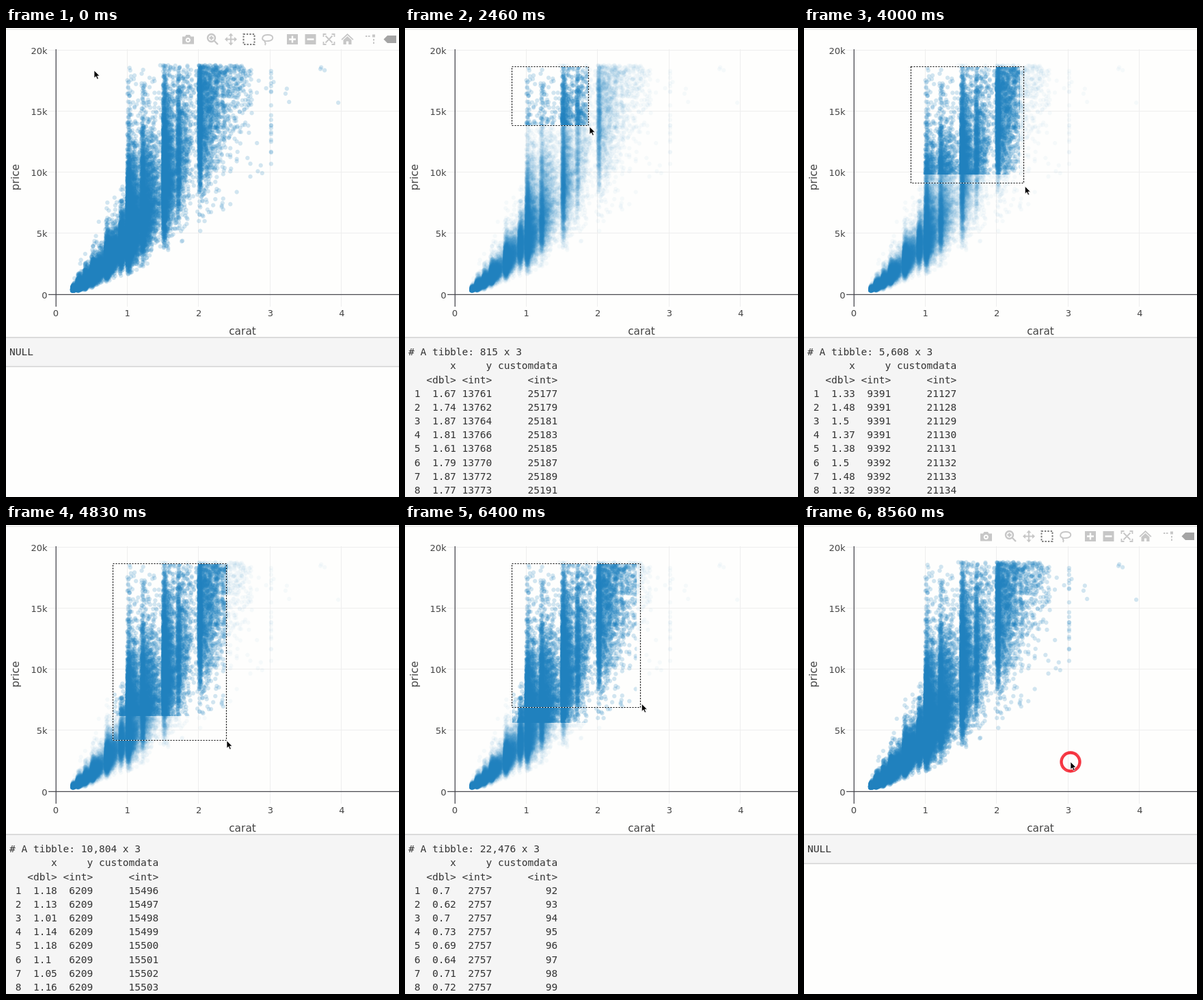
An HTML page with a canvas that plays this animation: 575x685 px, repeating every 8600 ms.

```html
<!DOCTYPE html>
<html lang="en">
<head>
<meta charset="utf-8">
<title>Linked selection</title>
<style>
  html, body { margin: 0; width: 575px; height: 685px; overflow: hidden; background: #fefefd; }
  svg, canvas { position: absolute; left: 0; top: 0; display: block; }
  text { fill: #444; font-family: "DejaVu Sans", sans-serif; }
  .tick { font-size: 13px; }
  .title { font-size: 15.4px; text-anchor: middle; }
  .console text { fill: #333; font: 14.5px "DejaVu Sans Mono", monospace; white-space: pre; }
</style>
</head>
<body>
<svg width="575" height="685">
  <path d="M0 2H575" stroke="#e6e6e6" stroke-width="1.5"/>
  <g id="axes"></g>
  <text class="title" x="346" y="447.5">carat</text>
  <text class="title" transform="translate(19 218) rotate(-90)">price</text>
  <g class="console">
    <rect id="panel" x="-2" y="452" width="579" height="43" fill="#f5f5f5" stroke="#d2d2d2" stroke-width="1.5"/>
    <g id="lines"></g>
  </g>
</svg>
<canvas id="plot" width="575" height="408"></canvas>
<svg width="575" height="685">
  <g id="modebar" fill="#c7c7c7" stroke="#c7c7c7" stroke-width="0">
    <path fill-rule="evenodd" d="M258 12.5h4l1.5-2.5h5.5l1.5 2.5h4.500v11h-17zM266.300 14a3.600 3.600 0 1 0 .01 0zm0 2a1.600 1.600 0 1 1-.01 0z"/>
    <g fill="none" stroke-width="2.4">
      <circle cx="300.5" cy="14.5" r="5.5"/><path d="M304.500 18.500l5.500 5.500M297.500 14.500h6M300.500 11.500v6"/>
      <path stroke-width="1.8" d="M321.500 16.500h15M329 9v15"/>
    </g>
    <path d="M329 7.500l3.500 4h-7zM329 25.500l3.500-4h-7zM320 16.500l4-3.500v7zM338 16.500l-4-3.500v7z"/>
    <rect x="347.5" y="9" width="16" height="15" fill="none" stroke="#7c7c7c" stroke-width="2" stroke-dasharray="2.4 2"/>
    <path fill="none" stroke-width="1.9" d="M379 19c-6-2-5-9 4-9s10 8 1 9c-4 .6-7-1-5 2 1 1 1 2 0 4"/>
    <path fill-rule="evenodd" d="M411 9h16v15h-16zM417.800 11.500v3.800h-3.800v2.400h3.800v3.800h2.400v-3.800h3.800v-2.400h-3.800v-3.800z"/>
    <path fill-rule="evenodd" d="M437.500 9h16v15h-16zM440.500 15.300v2.400h10v-2.400z"/>
    <path fill="none" stroke-width="1.8" d="M464.500 13V9h4M476.500 9h4v4M480.500 20v4h-4M468.500 24h-4v-4M467.500 11.500l10 10M477.500 11.500l-10 10"/>
    <path d="M499.500 8l9 8.500-1.200 1.200-7.800-7.300-7.800 7.300-1.200-1.200zM499.500 12l6 5.500v6.500h-4.300v-4.500h-3.400v4.500h-4.300v-6.500z"/>
    <path d="M526 11h2.500v2h-2.500zM530 11h2.500v2h-2.500zM536 9.500h4v4h-4zM537 16h2v2.500h-2zM537 20.500h2v2.500h-2z"/>
    <path fill="#a4a4a4" d="M552.500 16.500l5.500-5.500h13v11h-13z"/>
  </g>
  <g id="box" fill="none">
    <rect stroke="#fff"/>
    <rect stroke="#000" stroke-width="1.2" stroke-dasharray="2 2"/>
  </g>
  <g id="rings" fill="none" stroke="#f3101e" stroke-opacity=".85"></g>
  <path id="cursor" d="M0 0V11L2.600 8.700 4.400 12.800 6.300 12 4.500 8H8Z" fill="#000" stroke="#fff" stroke-width=".7"/>
</svg>
<script>
const LOOP = 8600, DRAG_START = 1190, DRAG_END = 7000, CLEARED = 8400;
const START = { x: 157, y: 57 };
const $ = id => document.getElementById(id);
const clamp = (v, lo = 0, hi = 1) => Math.min(hi, Math.max(lo, v));
const ramp = (t, from, to) => clamp((t - from) / (to - from));
const xOf = carat => 73 + 104.6 * carat;
const caratAt = x => (x - 73) / 104.6;
const yOf = price => 389.5 - price * 0.01783;

function set(el, attrs) {
  for (const k in attrs) el.setAttribute(k, attrs[k]);
}
function add(parent, tag, attrs, text = "") {
  const el = document.createElementNS("http://www.w3.org/2000/svg", tag);
  set(el, attrs);
  el.textContent = text;
  return parent.appendChild(el);
}

// Axes
const line = (d, stroke, width = 1) => add($("axes"), "path", { d, stroke, "stroke-width": width });
for (let i = 1; i < 5; i++) {
  line(`M${Math.round(xOf(i)) - 0.5} 31V407`, "#eee");
  line(`M62 ${Math.round(yOf(i * 5000)) - 0.5}H575`, "#eee");
}
line("M73.2 31V407M62 389.4H575", "#4a4a50", 1.3);
for (let i = 0; i < 5; i++) {
  add($("axes"), "text", { class: "tick", x: xOf(i), y: 421, "text-anchor": "middle" }, i);
  add($("axes"), "text", { class: "tick", x: 60.5, y: yOf(i * 5000) + 5, "text-anchor": "end" }, i ? i * 5 + "k" : 0);
}

// Simulated stones
let seed = 20;
function random() {
  seed = (seed + 0x6D2B79F5) | 0;
  let r = Math.imul(seed ^ (seed >>> 15), 1 | seed);
  r = (r + Math.imul(r ^ (r >>> 7), 61 | r)) ^ r;
  return ((r ^ (r >>> 14)) >>> 0) / 4294967296;
}
const exponential = () => -Math.log(1 - random());
const normal = () => Math.sqrt(2 * exponential()) * Math.cos(2 * Math.PI * random());

const MEDIAN = 4700, POWER = 1.68;
function priceFor(carat) {
  const up = carat < 1 ? 0.2 : 0.36 / Math.sqrt(carat), down = carat < 1 ? 0.2 : 0.25;
  let price;
  do {
    const z = normal() * (random() < 0.86 ? 1 : 1.7);
    price = MEDIAN * carat ** POWER * Math.exp(z * (z > 0 ? up : down));
  } while (price < Math.max(330, 1650 * carat ** 1.6) || price > 18800);
  return price;
}

const W = 575, H = 408, density = new Float32Array(W * H);
function stamp(x, y) {
  const cx = Math.floor(x), cy = Math.floor(y);
  for (let py = cy - 4; py <= cy + 4; py++)
    for (let px = cx - 4; px <= cx + 4; px++) {
      const cover = clamp(3.6 - Math.hypot(px + 0.5 - x, py + 0.5 - y));
      if (cover && px >= 0 && px < W && py >= 0 && py < H) density[py * W + px] += cover;
    }
}

// Stones crowd just above popular weights: carat, count
const popular = [
  [.23, 1800], [.3, 9500], [.4, 4700], [.5, 7000], [.7, 7500], [.9, 2800],
  [1, 9000], [1.2, 3600], [1.5, 3600], [1.7, 950], [2, 2400]
];
popular.forEach(([size, count], i) => {
  const next = i + 1 < popular.length ? popular[i + 1][0] : 2.6;
  for (let n = 0; n < count; n++) {
    const extra = random() < 0.3 ? 0.03 * random() : 0.35 * (next - size) * exponential();
    const carat = Math.round((size + extra) * 100) / 100;
    if (carat < 2.75) stamp(xOf(carat), yOf(priceFor(carat)));
  }
});
for (let i = 0; i < 38; i++)
  stamp(xOf(i % 2 ? 3.01 : 2.55 + 0.6 * exponential()), yOf(7000 + 11700 * Math.sqrt(random())));

// Overlapping translucent dots, composited from the density
function makeLayer(alpha) {
  const canvas = document.createElement("canvas");
  canvas.width = W;
  canvas.height = H;
  const g = canvas.getContext("2d"), image = g.createImageData(W, H);
  density.forEach((n, i) => image.data.set([32, 129, 190, 255 * (1 - (1 - alpha) ** n)], i * 4));
  g.putImageData(image, 0, 0);
  return canvas;
}
const strong = makeLayer(0.2), faint = makeLayer(0.04);
const plot = $("plot").getContext("2d");

function drawPlot(corner) {
  plot.clearRect(0, 0, W, H);
  if (!corner) return plot.drawImage(strong, 0, 0);
  plot.drawImage(faint, 0, 0);
  const w = Math.round(corner.x - START.x), h = Math.round(corner.y - START.y);
  if (w < 1 || h < 1) return;
  const area = [START.x, START.y, w, h];
  plot.clearRect(...area);
  plot.drawImage(strong, ...area, ...area);
}

// Pointer moves; the brisk ones slow down as they arrive
const move = (from, to, x, y, brisk) => ({ from, to, x, y, brisk });
const moves = [
  move(60, 160, 147, 61),
  move(530, 1150, START.x, START.y),
  move(DRAG_START, 2260, 269, 143, true),
  move(2440, 3100, 302, 181),
  move(3230, 4060, 325, 235),
  move(4100, 4500, 324, 279),
  move(4660, 4760, 323, 315),
  move(4860, 5400, 325, 342),
  move(5630, 6460, 348, 255),
  move(7460, 7660, 443, 344),
  move(7860, 8240, 390, 346)
];
function pointer(t) {
  let x = 129, y = 62;
  for (const m of moves) {
    const p = ramp(t, m.from, m.to), eased = m.brisk ? 1 - (1 - p) ** 3 : p;
    x += (m.x - x) * eased;
    y += (m.y - y) * eased;
  }
  return { x, y };
}

// Console output: each update lists the cheapest selected stones
const update = (time, count, price, id) => ({ time, count, price, id });
const updates = [
  update(1300, 20, 16234, 26550),
  update(1850, 246, 15012, 25931),
  update(2250, 815, 13761, 25177),
  update(3100, 2250, 12565, 24317),
  update(3800, 5608, 9391, 21127),
  update(4480, 10804, 6209, 15496),
  update(5390, 22476, 2757, 92),
  update(6700, 8794, 7538, 17962)
];
function tableRow({ time, count, price, id }, i) {
  const largest = Math.min((price / MEDIAN) ** (1 / POWER), caratAt(pointer(time).x));
  const jitter = Math.abs(Math.sin(id + i * 2.3));
  const carat = Math.round(largest * (0.85 + 0.15 * jitter) * 100) / 100;
  const y = price + Math.floor(i * 1500 / count), custom = id + i * Math.ceil(1000 / count);
  return ` ${i + 1}  ${String(carat).padEnd(4)} ${String(y).padStart(5)} ${String(custom).padStart(10)}`;
}
function printed(t) {
  const latest = updates.findLast(u => u.time <= t);
  if (!latest || t >= CLEARED) return ["NULL"];
  return [
    `# A tibble: ${latest.count.toLocaleString("en-US")} x 3`,
    "       x     y customdata",
    "   <dbl> <int>      <int>",
    ...Array.from({ length: 8 }, (_, i) => tableRow(latest, i))
  ];
}
const textLines = Array.from({ length: 11 }, (_, i) =>
  add($("lines"), "text", { x: 5, y: 478.3 + i * 20.15 }));

const clicks = [DRAG_START, 8240, 8530];
const rings = clicks.map(() => add($("rings"), "circle", {}));

function render(t) {
  const dragging = t >= DRAG_START && t < CLEARED;
  const dragTime = Math.min(t, DRAG_END);
  const corner = pointer(dragTime - 60);
  // Highlighting trails behind once many points are selected.
  const shownTime = dragTime < 3300 ? dragTime : Math.max(3230, Math.floor(dragTime / 200) * 200 - 200);
  drawPlot(dragging && pointer(shownTime - 60));

  set($("box"), { visibility: dragging ? "visible" : "hidden" });
  for (const rect of $("box").children)
    set(rect, {
      x: START.x - 0.5, y: START.y - 0.5,
      width: Math.max(0, Math.round(corner.x - START.x)),
      height: Math.max(0, Math.round(corner.y - START.y))
    });

  const tip = pointer(t);
  set($("cursor"), { transform: `translate(${tip.x} ${tip.y})` });

  clicks.forEach((at, i) => {
    const p = ramp(t, at, at + 950), { x, y } = pointer(at);
    set(rings[i], {
      cx: x, cy: y, r: 12.5 + 7 * p,
      "stroke-width": 3 * (1 - p) ** 1.5,
      visibility: t < at || p === 1 ? "hidden" : "visible"
    });
  });

  set($("modebar"), { opacity: 1 - ramp(t, 1150, 1350) + ramp(t, 7080, 7260) });

  const output = printed(t);
  set($("panel"), { height: output.length > 1 ? 240 : 42.5 });
  textLines.forEach((el, i) => {
    const value = output[i] || "";
    if (el.textContent !== value) el.textContent = value;
  });
}

const began = performance.now();
function frame() {
  render((performance.now() - began) % LOOP);
  requestAnimationFrame(frame);
}
frame();
</script>
</body>
</html>
```
